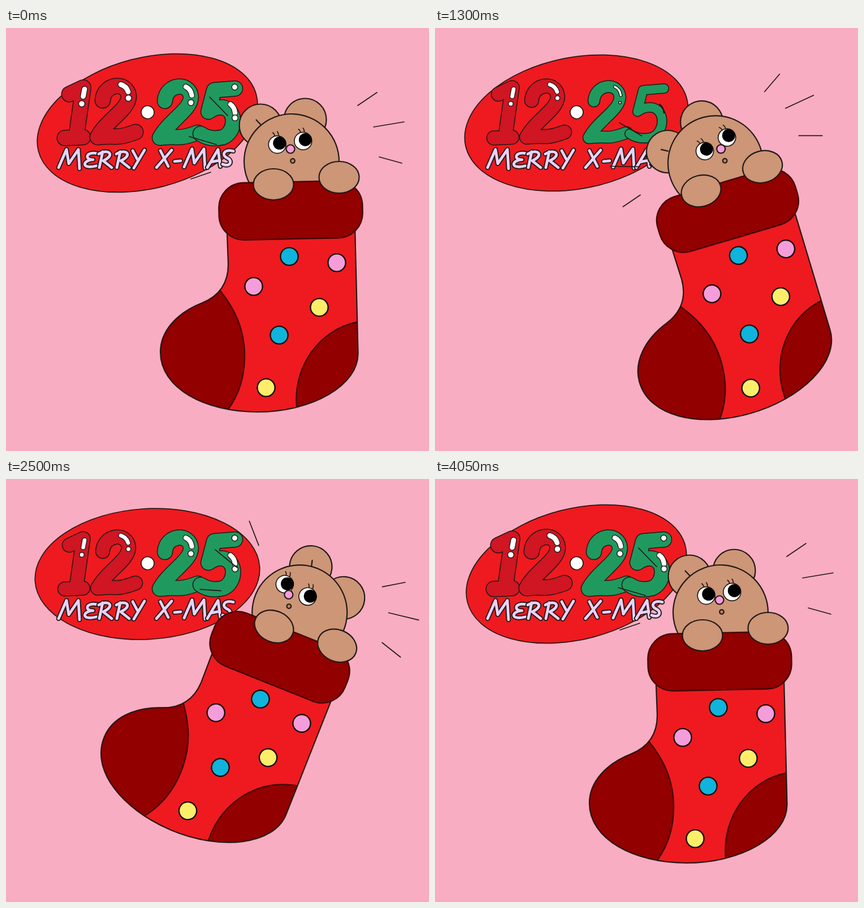
Write an HTML page that moves like this. It is 748 px wide and 748 px high and loops after 4100 ms.

```html
<!DOCTYPE html>
<html lang="en">
<head>
<meta charset="utf-8">
<title>Merry X-mas</title>
<style>
  html, body { margin: 0; width: 100%; height: 100%; overflow: hidden; background: #f9adc2; }
  svg { display: block; width: 100vw; height: 100vh; }
  .ink { stroke: #231815; stroke-width: 2.2; }
  .thin { stroke: #231815; stroke-width: 1.7; }
  .line { fill: none; stroke-linecap: round; stroke-linejoin: round; }
  .red { fill: #ee1a1f; }
  .dark { fill: #920000; stroke: #420606; stroke-width: 2.4; }
  .fur { fill: #cc9677; }
  .eye circle { vector-effect: non-scaling-stroke; }
</style>
</head>
<body>
<svg viewBox="0 0 748 748">
  <defs>
    <path id="body" d="M391 350V365L393 418C393 450 379 473 347 486C301 504 273 537 273 573C273 637 352 679 445 679C541 679 625 632 622.500 573L617 350Z"/>
    <clipPath id="inBody"><use href="#body"/></clipPath>
  </defs>

  <ellipse id="badge" class="red thin" rx="199" ry="115.5"/>
  <g id="digits" class="line"></g>
  <circle class="thin" cx="250.5" cy="149" r="11.5" fill="#fff"/>
  <g id="words" class="line" role="img" aria-label="MERRY X-MAS" transform="translate(0 .8)"></g>

  <g id="back">
    <path class="thin line" d="M360 122L392 155M324 192L372 206M327 267L362 255M622 137L656 114M650 175L704 166M660 228L700 239"/>
    <g id="ears">
      <circle class="fur ink" cx="450" cy="172" r="37.5"/>
      <circle class="fur ink" cx="529" cy="162" r="37.5"/>
      <path class="ink line" d="M442.5 162.5L451 171.5"/>
    </g>
    <circle class="fur ink" cx="505" cy="236" r="84"/>
  </g>

  <g id="face">
    <g class="eye"></g>
    <g class="eye"></g>
    <circle id="nose" class="ink" r="7.5" fill="#f59ddb"/>
    <circle id="mouth" class="ink" r="3.8" fill="#b98364"/>
  </g>

  <g id="front">
    <use href="#body" class="red"/>
    <g clip-path="url(#inBody)">
      <path class="dark" d="M260 440L357 440C398 482 422 525 422 580C422 618 412 648 393 674L380 700H260Z"/>
      <path class="dark" d="M640 517L621 520C555 533 508 597 514 669L517 700H640Z"/>
    </g>
    <use href="#body" class="ink" fill="none"/>
    <g id="spots" stroke="#150d0c" stroke-width="2.4"></g>
    <rect class="dark" x="376.5" y="272" width="254" height="101" rx="44" transform="rotate(-1.2 503.5 322)"/>
    <g id="paws">
      <ellipse class="fur ink" cx="473" cy="276.5" rx="35.5" ry="27.5"/>
      <ellipse class="fur ink" cx="589" cy="264" rx="35.5" ry="28"/>
    </g>
  </g>
</svg>

<script>
const INK = '#231815';
const LOOP = 4100, STEP = 50, FPS = 30;
const $ = id => document.getElementById(id);
const move = (el, value) => el.setAttribute('transform', value);

function add(parent, tag, attrs) {
  const el = document.createElementNS('http://www.w3.org/2000/svg', tag);
  for (const key in attrs) el.setAttribute(key, attrs[key]);
  parent.append(el);
  return el;
}

// An outlined round stroke; returns a function that sets its width.
function tube(parent, d, color, edge) {
  const rim = add(parent, 'path', { d, stroke: INK });
  const fill = add(parent, 'path', { d, stroke: color });
  return w => {
    rim.setAttribute('stroke-width', w > 0 ? w + edge : 0);
    fill.setAttribute('stroke-width', w);
  };
}

const smooth = p => p * p * (3 - 2 * p);

// Eased value from a list of [time, value] keys.
function track(t, keys) {
  if (t <= keys[0][0]) return keys[0][1];
  for (let i = 1; i < keys.length; i++) {
    const [t0, v0] = keys[i - 1], [t1, v1] = keys[i];
    if (t < t1) return v0 + (v1 - v0) * smooth((t - t0) / (t1 - t0));
  }
  return keys[keys.length - 1][1];
}

// Eased swing between -1 (at 0) and 1 (at half the period).
function swing(t, period) {
  const u = (t / period % 1 + 1) % 1;
  return 2 * smooth(2 * Math.min(u, 1 - u)) - 1;
}

// Lettering
const R = 'm7-28l-6 28m-1-24c16-10 31 1 8 12l15 12';
const M = 'l14-32l4 25l17-25l2 34';
[
  'M93 246' + M,
  'M161 221C140 217 139 233 154 232C134 233 133 250 160 243',
  'M164 246' + R,
  'M195 246' + R,
  'M224 216L232 231M245 215L226 247',
  'M273 216L287 244M293 215L266 246',
  'M298 235L309 234',
  'M315 245' + M,
  'M356 246L375 214L379 244M363 236L378 233',
  'M402 217C386 212 380 224 391 229C402 234 396 246 383 240'
].forEach(d => tube($('words'), d, '#e7d2f7', 3.8)(4.8));

// Digits
const TWO = 'M171 128C173 97 215 94 217 121C217 144 178 163 162 193Q181 191 193 192T229 184';
const RED = '#d01523', GREEN = '#20995f';
const thick = [[0, 26], [.633, 33], [1.1, 23.5], [3.5, 23.5], [4, 26]];
const lean = [[0, 25.5], [.633, 20], [1.233, 19.5], [1.633, 25.5]];
const leaner = [[0, 25.5], [.633, 14.5], [1.233, 15.2], [1.633, 25.5]];

const digits = [
  { d: 'M112 117L136.5 105.5L124 194M104 194.5L136 193', color: RED, keys: thick,
    shine: 'M139 108L136.5 121', dots: [[134, 134]] },
  { d: TWO, color: RED, keys: thick,
    shine: 'M203 100Q213 103 216 113', dots: [[216.5, 124]] },
  { d: TWO, color: GREEN, keys: lean, shift: 'translate(110 1)',
    shine: 'M208 103Q217 107 218.5 118', dots: [[217, 131]] },
  { d: 'M405 107L368 110L358 148Q372 138 386 141C408 148 406 184 384 193Q361 199 344 187', color: GREEN, keys: leaner,
    shine: 'M397 135Q404 140 405 150', dots: [[404.5, 104.5], [405, 159]] }
].map(({ d, color, keys, shift, shine, dots }) => {
  const g = add($('digits'), 'g', shift ? { transform: shift } : {});
  const setBody = tube(g, d, color, 3);
  const setShine = tube(g, shine, '#fff', 2.6);
  const drops = dots.map(([cx, cy]) => add(g, 'circle', { cx, cy, fill: '#fff', stroke: INK }));
  return t => {
    const w = track(t, keys), bar = Math.max(0, .8 * (w - 15.2));
    setBody(w);
    setShine(bar);
    for (const c of drops) {
      c.setAttribute('r', .64 * bar);
      c.setAttribute('stroke-width', Math.min(bar, 1.5));
    }
  };
});

// Spots on the stocking
const BLUE = '#0fb3dc', PINK = '#f59ddb', YELLOW = '#fdee6a';
[[501, 404, BLUE], [585, 415, PINK], [438, 457, PINK],
 [554, 494, YELLOW], [483, 543, BLUE], [460, 636, YELLOW]]
  .forEach(([cx, cy, fill]) => add($('spots'), 'circle', { cx, cy, r: 15.6, fill }));

// Eyes
const eyes = [...document.querySelectorAll('.eye')].map((g, i) => {
  const lash = add(g, 'path', { class: 'thin line', d: 'M-8-21q4 3 4 9M0-23q3 4 2 9' });
  const ball = add(g, 'g', {});
  add(ball, 'circle', { r: 15.5, fill: '#fff', class: 'thin' });
  add(ball, 'circle', { cx: 4, cy: -2.5, r: 11.5, fill: '#000' });
  return { g, lash, ball, side: i ? 1 : -1 };
});

function drawFace(a, t) {
  const bend = (x, y, x1, x2, y1, y2) => [x + x1 * a + x2 * a * a, y + y1 * a + y2 * a * a];
  const [ex, ey] = bend(502.5, 203, .415, .002, -.21, -.0024);
  const tilt = (-7.6 + 1.56 * a) * Math.PI / 180;
  const open = track(t % 1, [[.467, 1], [.633, .42], [.8, 1]]);
  for (const { g, lash, ball, side } of eyes) {
    const x = ex + side * 23 * Math.cos(tilt), y = ey + side * 23 * Math.sin(tilt);
    move(g, `translate(${x} ${y}) rotate(${1.08 * a})`);
    move(lash, `translate(0 ${(1 - open) * 13})`);
    move(ball, `scale(1 ${open})`);
  }
  move($('nose'), `translate(${bend(503, 214, -.16, .001, -.16, -.011)})`);
  move($('mouth'), `translate(${bend(507, 235, -.335, .002, -.163, -.0117)})`);
}

function draw(t) {
  // stocking: two swings per loop
  const a = 23.6 * swing(t + .5, 2);
  const lean = `rotate(${a} 512 271)`;
  move($('back'), lean);
  move($('front'), lean);
  move($('ears'), `rotate(${1.2 * a} 507 248)`);
  move($('paws'), `translate(${track(t, [[.4, 0], [.667, -32.4], [1.433, 0]])} 0)`);
  drawFace(a, t);

  // badge: three rocks per loop, slightly late
  const rock = 14.9 * swing(t - .045, 4 / 3);
  const size = track(t, [[.4, 1], [.667, 1.09], [1.133, 1.006], [1.6, 1]]);
  move($('badge'), `translate(250 168) rotate(${rock}) scale(${size})`);
  digits.forEach(set => set(t));
}

function tick(now) {
  const step = Math.floor(now % LOOP / STEP);
  const frame = Math.max(0, Math.ceil(step * 1.5) - 2) % 120;
  draw(frame / FPS);
  requestAnimationFrame(tick);
}
draw(0);
requestAnimationFrame(tick);
</script>
</body>
</html>
```
